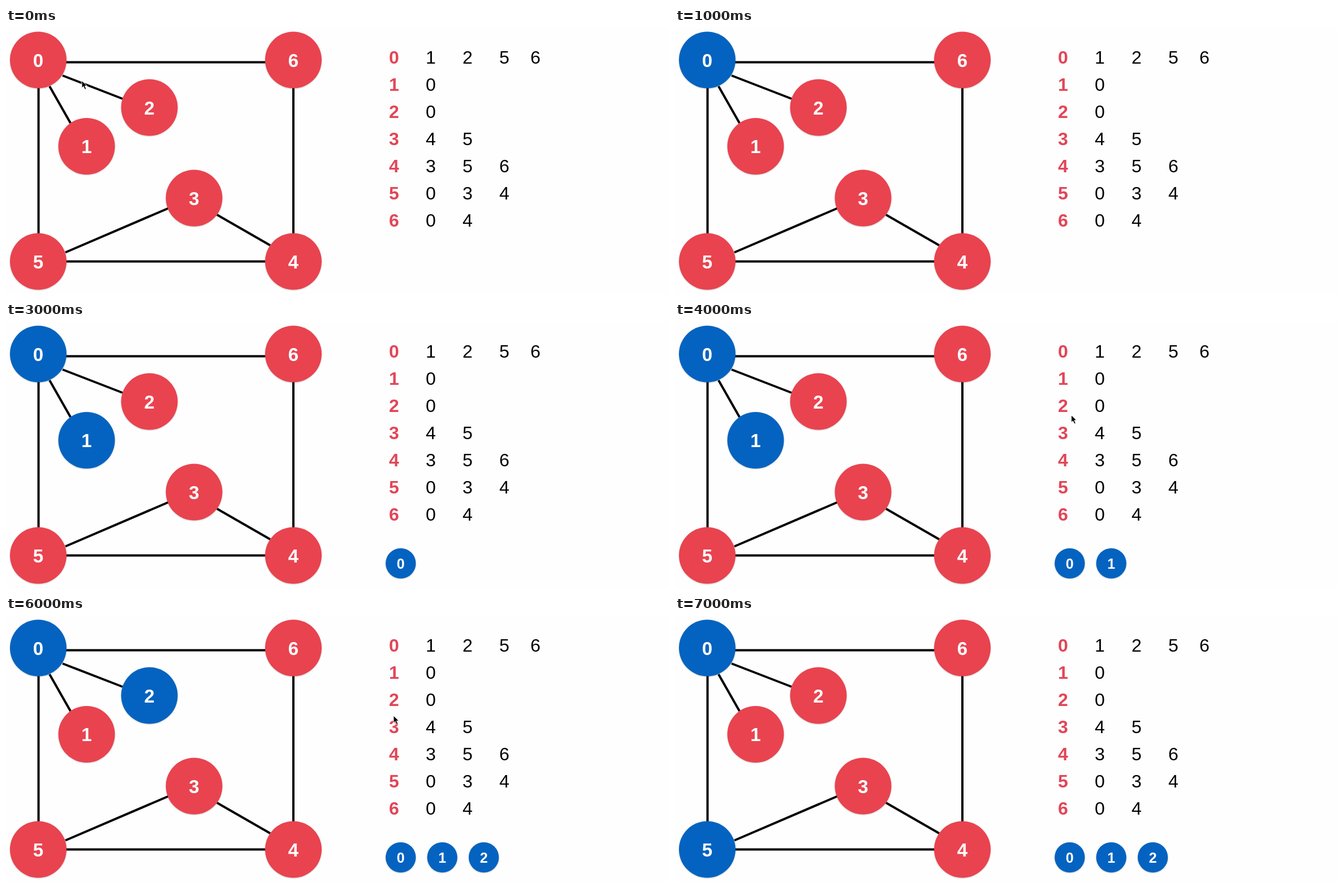
An HTML page for the animation above (8000 ms loop, 1172 by 470 pixels).

```html
<!DOCTYPE html>
<html lang="en">
<head>
<meta charset="utf-8">
<title>Depth-first search on a graph</title>
<style>
  html, body { margin: 0; width: 100%; height: 100%; overflow: hidden; background: #fefefe; }
  svg { display: block; width: 100%; height: 100%; }
  text { font-family: "Liberation Sans", Arial, sans-serif; text-anchor: middle; }
  .edge { stroke: #000; stroke-width: 4; }
  .shade { fill: #000; opacity: .2; }
  .label { fill: #fff; font-weight: bold; }
  .key { fill: #e14658; font-weight: bold; font-size: 32px; }
  .item { fill: #000; font-size: 32px; }
</style>
</head>
<body>
<svg id="stage" viewBox="0 0 1172 470">
  <defs>
    <filter id="soft" x="-10%" y="-10%" width="120%" height="120%"><feGaussianBlur stdDeviation=".8"/></filter>
  </defs>
</svg>
<script>
const RED = '#e9434f', BLUE = '#0463c0';
const LOOP = 8000, STEP = 1000;
const stage = document.getElementById('stage');

const nodes = [[57, 56.5], [142.5, 209], [253.5, 140.5], [332.5, 300.5], [508, 412.5], [57, 412.5], [508, 56.5]];
const edges = [
  [57, 60.5, 508, 60.5], [57.5, 57, 57.5, 412], [508, 57, 508, 412], [57, 412.5, 508, 412.5],
  [77, 103, 114, 168], [100, 84, 206, 125], [105, 396.5, 287, 318.5], [373, 330, 467, 384]
];
const adjacency = ['1256', '0', '0', '45', '356', '034', '04'];
const columns = [751, 816, 881, 936];

// One entry per step: visited nodes, length of the visit list, pointer tip.
const steps = [
  { blue: [], listed: 0, pointer: [134, 93] },
  { blue: [0], listed: 0 },
  { blue: [0], listed: 1, pointer: [687, 63] },
  { blue: [0, 1], listed: 1 },
  { blue: [0, 1], listed: 2, pointer: [700.5, 164.5] },
  { blue: [0], listed: 2, pointer: [787, 54] },
  { blue: [0, 2], listed: 3, pointer: [685, 176] },
  { blue: [0, 5], listed: 3 }
];

function add(parent, tag, attrs, text) {
  const el = document.createElementNS('http://www.w3.org/2000/svg', tag);
  for (const name in attrs) el.setAttribute(name, attrs[name]);
  if (text !== undefined) el.textContent = text;
  parent.appendChild(el);
  return el;
}

function disc(x, y, r, size, label, fill) {
  const group = add(stage, 'g', {});
  add(group, 'circle', { class: 'shade', cx: x, cy: y + 1, r, filter: 'url(#soft)' });
  const body = add(group, 'circle', { cx: x, cy: y, r, fill });
  add(group, 'text', { class: 'label', x, y: y + 0.8 + size * 0.35, 'font-size': size }, label);
  return { group, body };
}

for (const [x1, y1, x2, y2] of edges) add(stage, 'line', { class: 'edge', x1, y1, x2, y2 });
const discs = nodes.map(([x, y], i) => disc(x, y, 50, 33, i, RED));

adjacency.forEach((row, i) => {
  const y = 63 + i * 48;
  add(stage, 'text', { class: 'key', x: 686, y }, i);
  [...row].forEach((n, j) => add(stage, 'text', { class: 'item', x: columns[j], y }, n));
});

const visits = [0, 1, 2].map(i => disc(697.8 + i * 73.4, 426.5, 26.7, 25, i, BLUE));
const pointer = add(stage, 'path', {
  d: 'M0 0V13L3 10.3L5.4 15.6L7.8 14.5L5.5 9.3H9.5Z',
  fill: '#000', stroke: '#fff', 'stroke-width': 1, 'stroke-linejoin': 'round'
});

function show(el, visible) {
  el.setAttribute('visibility', visible ? 'visible' : 'hidden');
}

function render(time) {
  const step = steps[Math.floor((time % LOOP) / STEP)];
  discs.forEach((d, i) => d.body.setAttribute('fill', step.blue.includes(i) ? BLUE : RED));
  visits.forEach((v, i) => show(v.group, i < step.listed));
  show(pointer, step.pointer);
  if (step.pointer) pointer.setAttribute('transform', `translate(${step.pointer})`);
}

const start = performance.now();
function tick() {
  render(performance.now() - start);
  requestAnimationFrame(tick);
}
tick();
</script>
</body>
</html>
```
